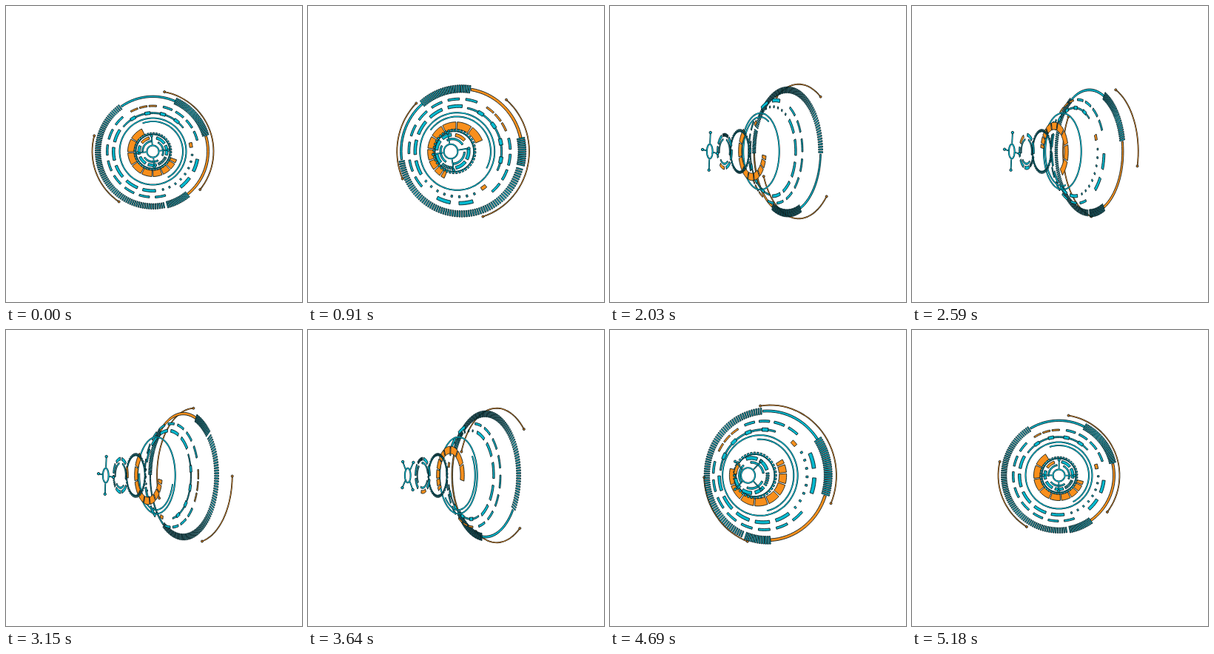
These frames come from a looping animation (400x400 px, 5250 ms). An HTML page with a canvas:

```html
<!DOCTYPE html>
<html>
<head>
<meta charset="utf-8">
<style>
html, body { margin: 0; width: 100%; height: 100%; overflow: hidden; background: #fff; }
canvas { display: block; width: 100vmin; height: 100vmin; }
</style>
</head>
<body>
<canvas id="stage" width="400" height="400"></canvas>
<script>
const ctx = document.getElementById('stage').getContext('2d');
const LOOP = 5250, FRAME = 70, CAMERA = 540, RAD = Math.PI / 180;
const TEAL = '#06b9cf', ORANGE = '#f98f1c', RUST = '#d67a1e', INK = '#04171b';
const view = { sin: 0, cos: 1, zoom: 1, spread: 0, x: 198.5, y: 196.5 };
let ringZ = 0, ringTurn = 0;

// Select the depth and spin (degrees) used by the following shapes.
function ring(z, turn) {
  ringZ = z * view.spread;
  ringTurn = turn;
}

function project(r, deg) {
  const a = (deg + ringTurn) * RAD, x = r * Math.cos(a), y = r * Math.sin(a);
  const depth = x * view.sin + ringZ * view.cos;
  const s = view.zoom * CAMERA / (CAMERA - depth);
  return [view.x + (x * view.cos - ringZ * view.sin) * s, view.y + y * s];
}

function trace(r, a, b) {
  const n = Math.max(1, Math.ceil(Math.abs(b - a) / 4));
  for (let i = 0; i <= n; i++) ctx.lineTo(...project(r, a + (b - a) * i / n));
}

function paint(color) {
  ctx.fillStyle = color;
  ctx.fill();
  ctx.lineWidth = 0.85;
  ctx.strokeStyle = INK;
  ctx.stroke();
}

function sector(r0, r1, a, b, color = TEAL) {
  ctx.beginPath();
  trace(r1, a, b);
  trace(r0, b, a);
  ctx.closePath();
  paint(color);
}

// Evenly spaced sectors from a to b, each filling part of its slot.
function dashes(r0, r1, a, b, count, fill, color) {
  const step = (b - a) / count;
  for (let i = 0; i < count; i++) {
    sector(r0, r1, a + i * step, a + (i + fill) * step, color);
  }
}

function outlined(width, color) {
  ctx.strokeStyle = INK;
  ctx.lineWidth = width + 0.9;
  ctx.stroke();
  ctx.strokeStyle = color;
  ctx.lineWidth = width;
  ctx.stroke();
}

function wire(r, a, b, color = TEAL, width = 1.1) {
  ctx.beginPath();
  trace(r, a, b);
  outlined(width, color);
}

function dot(r, a, size, color) {
  ctx.beginPath();
  ctx.arc(...project(r, a), size, 0, 7);
  paint(color);
}

function setView(t) {
  const open = Math.max(0, Math.min(1, (t - 580) / 1320, (5170 - t) / 1390));
  const swell = Math.sin(Math.PI * open);
  const tilt = 61 * open * RAD;
  view.sin = Math.sin(tilt);
  view.cos = Math.cos(tilt);
  view.spread = Math.sin(open * Math.PI / 2);
  view.zoom = 1 + 0.15 * open + 0.18 * swell;
  view.x = 198.5 + 2.5 * swell;
}

function draw(t) {
  const u = t / LOOP;
  const turn = 360 * (u - 0.097 * Math.sin(2 * Math.PI * u));
  setView(t);
  ctx.fillStyle = '#fff';
  ctx.fillRect(0, 0, 400, 400);
  ctx.lineJoin = 'round';

  // Outer brackets
  ring(-52, turn);
  for (const [a, b] of [[-79, 39], [124, 195]]) {
    wire(82, a, b, RUST, 0.9);
    dot(82, a, 1.5, RUST);
    dot(82, b, 1.5, RUST);
  }

  // Main dial
  ring(-37, -2 * turn);
  sector(73, 75.4, 235, 294);
  sector(73, 76, -16, 51, ORANGE);
  dashes(70.5, 78, 78, 235, 72, 0.5);
  dashes(70, 79, -66, -16, 26, 0.6);
  dashes(70, 79, 51, 76, 13, 0.6);

  // Dashed dials
  ring(-22, 2 * turn);
  dashes(60.5, 62.5, -119, -83, 3, 0.8, ORANGE);
  dashes(60.5, 63, -77, -9, 4, 0.7);
  dashes(59, 63, 10, 62, 2, 0.62);
  dashes(60.5, 63, 74, 236, 8, 0.65);

  ring(-19, 2 * turn);
  sector(50, 54, -13, -6, ORANGE);
  dashes(52, 54.5, 4, 84, 8, 0.22);
  dashes(51.5, 55, 86, 221, 5, 0.7);
  sector(51, 52.8, -140, -38);
  dashes(50, 54, -125, -33, 4, 0.35);

  // Thin circles
  ring(-3, -turn);
  wire(45, 0, 360);
  wire(40.5, -110, 60);

  // Growing orange blocks
  ring(7, 3 * turn);
  const edge = i => 18 + 227 * (i / 9) ** 1.4;
  for (let i = 0; i < 9; i++) {
    sector(25.5, 34, edge(i) + 1.4, edge(i + 1) - 1.4, ORANGE);
  }

  // Inner gears
  ring(23, -2 * turn);
  wire(23, 0, 360, TEAL, 0.8);
  dashes(23, 25.5, 0, 360, 40, 0.55);

  ring(42, 2 * turn);
  dashes(17, 20.5, -75, 25, 2, 0.8);
  dashes(17, 20.5, 25, 70, 6, 0.6);
  dashes(17, 20.5, 75, 215, 3, 0.75);
  sector(17, 20.5, 218, 255, ORANGE);
  dashes(13, 15, -60, 300, 3, 0.7);

  // Hub with four antennae
  ring(60, -3 * turn - 5);
  wire(8, 0, 360, TEAL, 1.2);
  for (let a = 0; a < 360; a += 90) {
    ctx.beginPath();
    ctx.moveTo(...project(9, a));
    ctx.lineTo(...project(20, a));
    outlined(0.9, TEAL);
    dot(21, a, 1.7, TEAL);
  }
}

const start = performance.now();
function tick() {
  const t = (performance.now() - start) % LOOP;
  draw(Math.floor(t / FRAME) * FRAME);
  requestAnimationFrame(tick);
}
tick();
</script>
</body>
</html>
```
